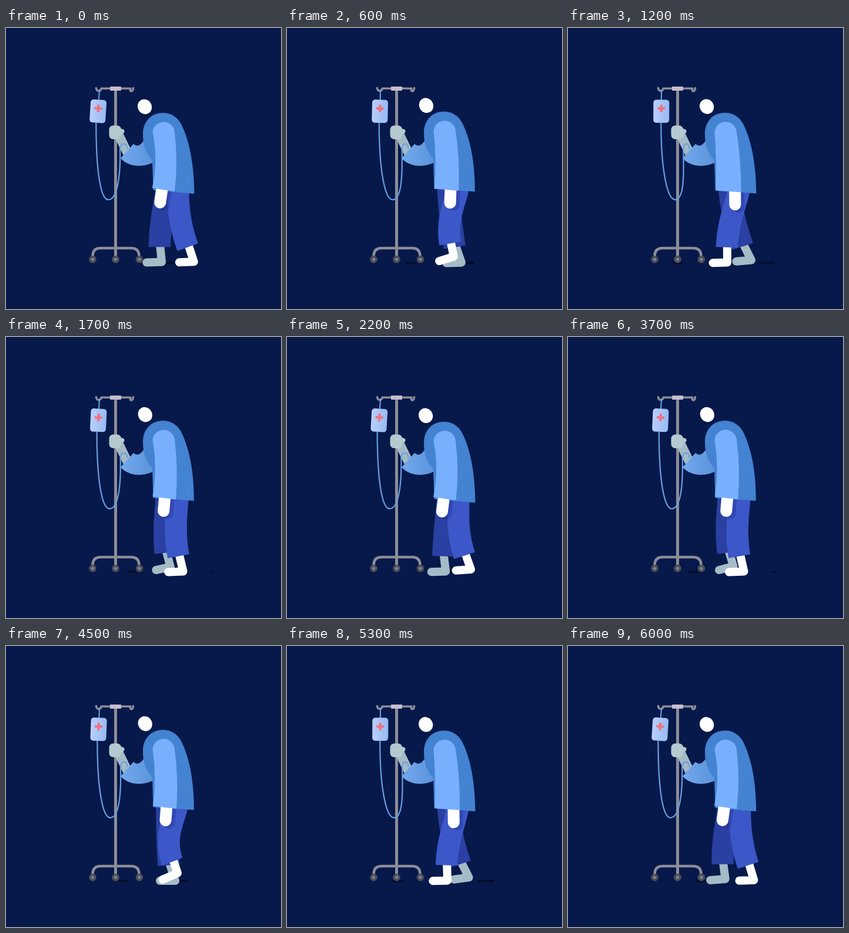
An HTML page with a canvas for the animation above (6100 ms loop, 468x480 px).

```html
<!DOCTYPE html>
<html lang="en">
<head>
<meta charset="utf-8">
<title>Walking with a drip stand</title>
<style>
html, body { margin: 0; width: 100%; height: 100%; overflow: hidden; background: #07194a; }
canvas { display: block; }
</style>
</head>
<body>
<canvas id="stage" width="468" height="480"></canvas>
<script>
const ctx = document.getElementById('stage').getContext('2d');
const LOOP = 6100, STEP = 100, CYCLE = LOOP / 3, TAU = Math.PI * 2;

// Walk cycle: phase, cuff x, cuff y, cuff tilt (deg), toe x, toe y, heel x, heel y
const GAIT = [
  [-.01, 309, 374.5, -20, 294.7, 400.5, 319.5, 399.5],
  [.082, 302, 373.5, -18, 287.5, 398.8, 313, 397],
  [.213, 283, 368.5, -21, 266.3, 399, 292, 388],
  [.325, 276, 368.5, -6, 256.5, 398, 281, 392],
  [.49, 265.5, 374, 0, 239.5, 400.5, 265.3, 399.5],
  [.585, 270, 374.5, 2, 246, 401.2, 270.5, 400.5],
  [.713, 281, 374.5, -4, 262, 401, 288, 401],
  [.822, 292, 374.5, -10, 274.3, 401.5, 299.8, 400.5]
];

function key(i) {
  const n = GAIT.length, turn = Math.floor(i / n), k = GAIT[i - turn * n];
  return [k[0] + turn, ...k.slice(1)];
}

// Smooth periodic interpolation of the walk cycle
function gait(phase) {
  phase -= Math.floor(phase);
  let i = 0;
  while (key(i + 1)[0] <= phase) i++;
  const [a, b, c, d] = [i - 1, i, i + 1, i + 2].map(key);
  const span = c[0] - b[0], u = (phase - b[0]) / span, u2 = u * u, u3 = u2 * u;
  return b.slice(1).map((from, j) => {
    const m = j + 1;
    const s0 = (c[m] - a[m]) / (c[0] - a[0]) * span;
    const s1 = (d[m] - b[m]) / (d[0] - b[0]) * span;
    return (2 * u3 - 3 * u2 + 1) * from + (u3 - 2 * u2 + u) * s0
      + (3 * u2 - 2 * u3) * c[m] + (u3 - u2) * s1;
  });
}

function fill(path, color) {
  ctx.fillStyle = color;
  ctx.fill(new Path2D(path));
}

function stroke(path, color, width, cap = 'round') {
  ctx.strokeStyle = color;
  ctx.lineWidth = width;
  ctx.lineCap = cap;
  ctx.lineJoin = 'round';
  ctx.stroke(new Path2D(path));
}

function disc(x, y, r, color) {
  ctx.fillStyle = color;
  ctx.beginPath();
  ctx.arc(x, y, r, 0, TAU);
  ctx.fill();
}

function box(x, y, w, h, r, color) {
  ctx.fillStyle = color;
  ctx.beginPath();
  ctx.roundRect(x, y, w, h, r);
  ctx.fill();
}

function blend(x0, x1, from, to) {
  const g = ctx.createLinearGradient(x0, 0, x1, 0);
  g.addColorStop(0, from);
  g.addColorStop(1, to);
  return g;
}

function ground(ms) {
  ctx.save();
  ctx.beginPath();
  ctx.rect(140, 395, 213.5, 12);
  ctx.clip();
  // start time, end time, x at start, length
  for (const [start, end, x, w] of [[0, 1800, 257, 29], [250, 950, 182, 17], [900, CYCLE, 162, 17]])
    if (ms >= start && ms < end) box(x + (ms - start) * .055, 399.5, w, 3.5, 1.5, '#030d28');
  ctx.restore();
}

function stand() {
  const metal = '#8c8d98';
  stroke('M147.5 393V390Q147.5 376 161 376H213Q226.5 376 226.5 390V393', metal, 4.6, 'butt');
  stroke('M186.5 104V392', metal, 5, 'butt');
  stroke('M153.5 102.5C153.5 109 162 109 162 103.3H212C209 109 216.5 110 216.5 102.5', metal, 3.6);
  box(177, 100, 19, 7, 1, '#c6bdcd');
  for (const x of [147.5, 186.5, 227]) {
    disc(x, 395.3, 6.3, '#4c4f5a');
    disc(x, 395.3, 2.5, '#858690');
  }
}

function bag(swing) {
  ctx.save();
  ctx.translate(159, 105);
  ctx.rotate(1.8 * (1 - swing) * Math.PI / 180);
  stroke('M0 1V20', '#6ea3e6', 2);
  box(-13.5, 17.5, 27, 39.5, 5, blend(-13, 13, '#b9cffb', '#98baf3'));
  stroke('M-6.5 32.5H6.5M0 26V39', '#f2727c', 4, 'butt');
  ctx.restore();
}

function tube(swing) {
  const x = 156 + 2.7 * swing, low = 178.5 + 4.5 * swing, right = 195.3 + 1.2 * swing;
  stroke(`M${x} 162C${x} 245 ${low - 13} 293.3 ${low} 293.3C${low + 15} 293.3 ${right + 1} 255 ${right} 207
    C${right} 194 206.5 196 206.5 206`, '#6a9fe2', 2.2);
}

function farArm() {
  stroke('M192 183L206 212', '#a4bac5', 16);
  box(175.5, 166.5, 20.5, 23.5, 7, '#b5c9d0');
  stroke('M192 175L197.5 176.5', '#b5c9d0', 8);
  fill('M195 222.5L217 198Q225 206 234 193L250 190V230C232 239 208 237 195 222.5Z',
    blend(196, 248, '#72a8ec', '#5c95dc'));
}

function leg(phase, hipX, cuffShift, skin, cloth) {
  const [cx, cy, tilt, toeX, toeY, heelX, heelY] = gait(phase);
  const x = cx + cuffShift, a = tilt * Math.PI / 180;
  const kneeX = x + 50 * Math.sin(a), kneeY = cy - 50 * Math.cos(a);
  stroke(`M${toeX} ${toeY}L${heelX} ${heelY}L${x + .5} ${cy - 6}`, skin, 14);
  stroke(`M${hipX} 262C${hipX} 288 ${kneeX} ${kneeY} ${x} ${cy}`, cloth, 37.5, 'butt');
}

function torso(s, lift) {
  const hand = `M${276 + 9.5 * s} 268L${274.3 + 12 * s} ${300.2 + 2 * s}`;
  ctx.save();
  ctx.translate(0, -2.2 * lift);

  ctx.save();
  ctx.translate(6, 4);
  stroke(hand, 'rgba(22,30,120,.25)', 20);
  ctx.restore();

  ctx.fillStyle = '#fff';
  ctx.beginPath();
  ctx.ellipse(236 + .9 * lift, 134.5, 11.8, 13, -.52, 0, TAU);
  ctx.fill();

  fill(`M250.5 277L249 226C237 213 233 199 233 181C233 160 247 145 267 145C281 145 291 152 297.5 163
    C313 193 320 235 ${320.5 - .7 * lift} ${283.3 - 1.7 * lift}Z`, '#4482d2');
  stroke(hand, '#fff', 20);
  fill(`M249.5 178A18.8 18.8 0 0 1 287 178Q${294 + s} 226 ${291 + 4 * s} ${280 + s}
    L${250.3 + 1.5 * s} ${276 + 2.5 * s}Q${256 - 3.5 * s} 226 249.5 178Z`, '#78b0fe');
  ctx.restore();
}

function draw(time) {
  const ms = time % CYCLE, phase = ms / CYCLE;
  const swing = -Math.cos(TAU * phase);
  const lift = (1 - Math.cos(2 * TAU * (phase - .03))) / 2;

  ctx.fillStyle = '#07194a';
  ctx.fillRect(0, 0, 468, 480);
  ground(ms);
  stand();
  bag(swing);
  farArm();
  tube(swing);
  leg(phase + .5, 274, -4, '#a5bbc7', '#2a40a2');
  leg(phase, 292.5, 0, '#fff', '#3b57c8');
  torso(swing, lift);
}

const begin = performance.now();
function tick() {
  const time = (performance.now() - begin) % LOOP;
  draw(Math.floor(time / STEP) * STEP);
  requestAnimationFrame(tick);
}
tick();
</script>
</body>
</html>
```
